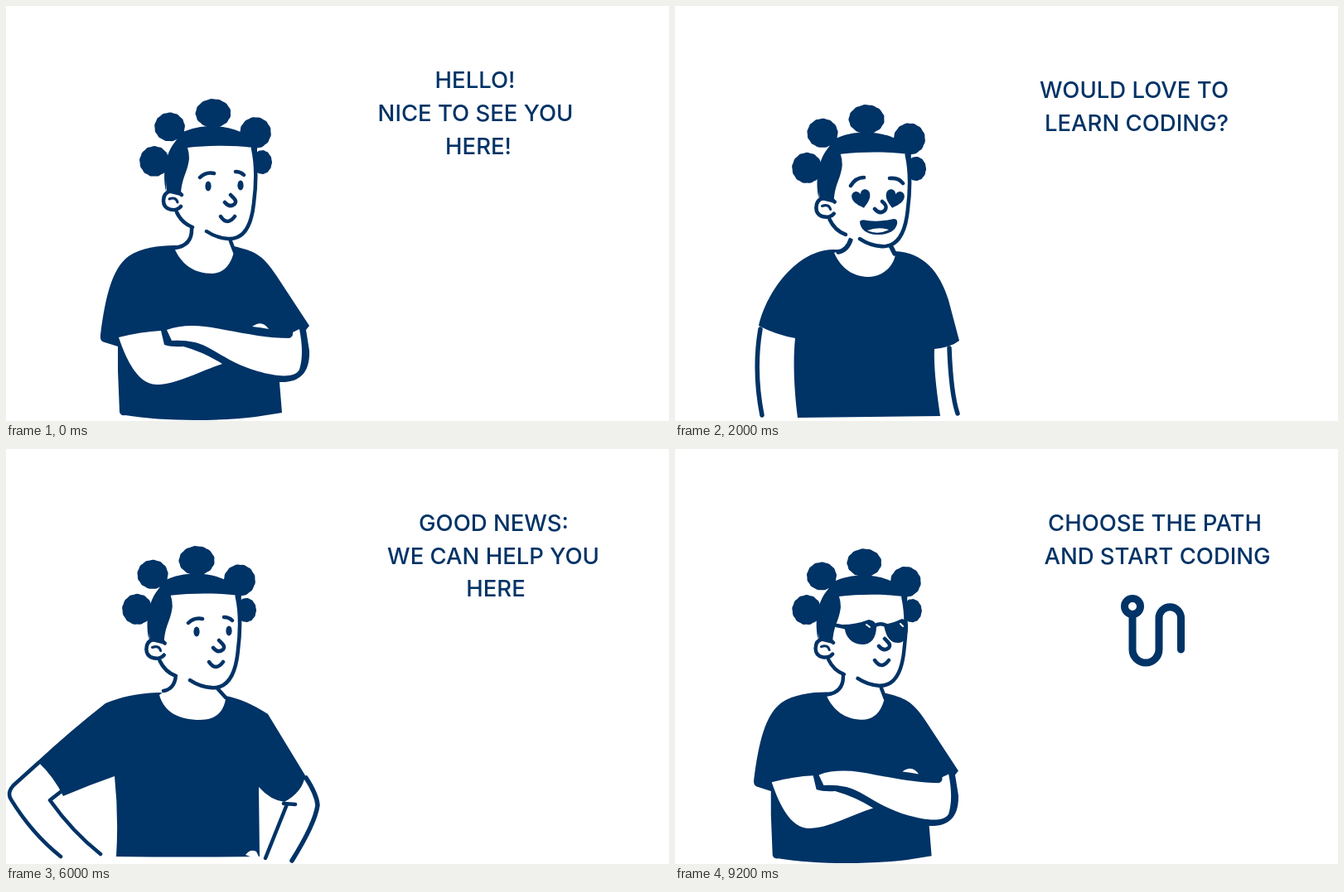
These frames come from a looping animation (800x501 px, 10 s). An HTML page:

```html
<!DOCTYPE html>
<html lang="en">
<head>
<meta charset="utf-8">
<title>Learn coding</title>
<style>
  html, body { margin: 0; width: 100%; height: 100%; overflow: hidden; background: #fff; }
  svg { display: block; width: 100%; height: 100%; }
  text { font: 500 27.5px Inter, sans-serif; text-anchor: middle; }
  .skin { fill: #fff; }
  .line { fill: none; stroke: #036; stroke-width: 4.5; stroke-linecap: round; stroke-linejoin: round; }
  .thick { stroke-width: 5.5; }
  .thin { stroke-width: 3; }
</style>
</head>
<body>
<svg viewBox="0 0 800 501" fill="#036">
  <defs>
    <g id="head">
      <path id="buns"/>
      <path d="M193 224C189 206 191 183 201 168L212 153C234 142 264 143 283 152L303 164V192H195Z"/>
      <path d="M192 190H224L214 230L194 225Z"/>
      <path class="skin" d="M219 171C245 168 275 168 298 171Q300 188 300 215C299 250 293 280 270 281C250 281 216 270 206 248L211 228C212 206 219 202 221 184Q221 177 219 171Z"/>
      <path class="line" d="M298 172C302 190 302 215 299 238C296 267 286 282 268 281Q254 280 242 272M206 249Q212 262 225 267"/>
      <path class="skin line" d="M212 228C206 221 190 221 190 235C190 247 205 249 211 242"/>
      <path class="line thin" d="M197 233Q205 230 207 237"/>
    </g>

    <g id="smile">
      <path class="line" d="M271 228C275 232 279 235 276 239Q270 244 264 237M259 254Q267 266 276 254"/>
    </g>
    <g id="calm">
      <ellipse cx="244" cy="217.5" rx="3.6" ry="6"/>
      <ellipse cx="283" cy="216.5" rx="3.6" ry="6"/>
      <path class="line" d="M234 207Q241 200 251 202M277 200Q283 200 287 204"/>
      <use href="#smile"/>
    </g>
    <path id="heart" d="M0 12C-8 6-12 1-11-5C-9-11-2-11 0-5C2-11 9-11 11-5C12 1 8 6 0 12Z"/>

    <g id="crossed">
      <path d="M203 289C184 289 163 292 148 302C128 317 120 350 114 397Q113 405 119 406L135 411V440L137 490Q138 495 144 494C185 501 250 502 301 496L333 491L330 454C355 455 367 442 366 416L362 391L366 386L326 325C309 299 299 296 275 290Z"/>
      <path class="skin" d="M224 266L223 282Q215 291 203 292C211 311 226 323 249 323C264 322 271 312 275 297L271 282Z"/>
      <path class="line" d="M224 268Q225 289 204 292M271 284L276 297"/>
      <path class="skin" d="M136 400Q164 393 187 392L191 409Q200 412 214 411Q239 418 261 432C233 441 206 457 181 457C160 456 146 430 136 400Z"/>
      <path class="skin" d="M194 391C215 383 241 386 264 391C292 396 316 401 342 401Q347 399 346 394L354 390Q360 420 354 439C348 450 325 447 304 441C266 430 249 411 228 406Q213 403 200 404Z"/>
      <path class="skin" d="M297 387Q309 378 317 390Q307 388 297 387Z"/>
    </g>

    <g id="relaxed">
      <path d="M190 294C148 295 111 343 101 386Q122 397 145 401C142 430 144 467 148 497L320 495C316 467 312 438 313 414Q333 412 343 404L330 355C320 322 300 297 265 296Z"/>
      <path class="skin" d="M210 278L208 291L192 298C201 318 216 327 234 327C250 326 263 316 266 300L259 284Z"/>
      <path class="line thick" d="M212 282Q208 295 197 297M260 289L265 299"/>
      <path class="line thick" d="M103 390C97 425 99 463 105 494M331 413C332 440 335 474 341 492"/>
    </g>

    <g id="akimbo">
      <path d="M184 294C156 295 137 300 120 307Q78 340 38 377Q58 396 69 419L101 406L131 395Q136 443 133 492Q220 493 306 492L305 408Q319 424 336 426Q358 414 361 394L316 320Q288 302 265 298Z"/>
      <path class="skin" d="M204 270L202 284L185 297C191 318 209 327 234 327C253 327 262 318 265 302L256 285Z"/>
      <path class="line" d="M205 274Q203 290 190 292M256 290L265 300"/>
      <path class="line" d="M39 379L9 406Q1 415 6 423Q31 464 66 492M67 413L53 424Q80 462 114 489M335 428L349 429M339 429L313 494"/>
      <path class="line thick" d="M362 397Q375 417 376 430Q373 452 345 497"/>
      <path class="skin" d="M289 490Q295 482 302 486L306 494H300Z"/>
    </g>
  </defs>

  <g class="scene">
    <use href="#crossed"/><use href="#head"/><use href="#calm"/>
    <text x="566" y="99">HELLO!</text>
    <text x="566.5" y="139">NICE TO SEE YOU</text>
    <text x="570" y="179">HERE!</text>
  </g>

  <g class="scene">
    <use href="#relaxed"/>
    <use href="#head" transform="translate(-22 5.6) scale(1.0126)"/>
    <path class="line" d="M212 217Q218 207 228 207M259 208Q270 207 275 214"/>
    <use href="#heart" transform="translate(225 232) rotate(-14)"/>
    <use href="#heart" transform="translate(265 232) rotate(14)"/>
    <path class="line" d="M250 236C255 240 256 243 253 247Q247 252 241 245"/>
    <path d="M223 260Q225 257 232 259Q248 261 264 257Q269 257 268 263C266 272 257 276 244 276C231 276 223 269 223 260Z"/>
    <path class="skin" d="M232 271Q245 266 258 270Q245 277 232 271Z"/>
    <text x="554" y="111">WOULD LOVE TO</text>
    <text x="557" y="151">LEARN CODING?</text>
  </g>

  <g class="scene">
    <use href="#relaxed" x="-2"/>
    <use href="#head" transform="translate(-24 5.6) scale(1.0126)"/>
    <path class="line" d="M210 212Q221 208 233 208M247 205Q258 205 267 209"/>
    <ellipse class="skin line" cx="226" cy="230" rx="18" ry="13.5"/>
    <ellipse class="skin line" cx="261" cy="229" rx="13.5" ry="13"/>
    <circle cx="231" cy="230.5" r="4.3"/>
    <circle cx="261" cy="229.5" r="4.3"/>
    <path class="line" d="M255 239C256 245 262 248 257 252Q253 255 247 252"/>
    <path class="line thin" d="M206 244Q212 250 222 250"/>
    <path d="M222 267Q242 261 264 260Q269 262 266 267Q244 267 224 269Z"/>
    <text x="591" y="53">....BUT ....</text>
    <text x="592" y="108">THERE ARE</text>
    <text x="588" y="148">SO MANY TUTORIALS,</text>
    <text x="588.5" y="188">ARTICLES,</text>
    <text x="588" y="228">TRUVOKA VIDEOS</text>
    <text x="592" y="268">....</text>
  </g>

  <g class="scene">
    <use href="#akimbo"/>
    <use href="#head" transform="translate(-23 3.6) scale(1.0126)"/>
    <use href="#calm" x="-14" y="3"/>
    <text x="588.5" y="99">GOOD NEWS:</text>
    <text x="588" y="139">WE CAN HELP YOU</text>
    <text x="591" y="178">HERE</text>
  </g>

  <g class="scene">
    <g transform="translate(-16.4 10.6) scale(.979)">
      <use href="#crossed"/><use href="#head"/>
    </g>
    <use href="#smile" x="-18" y="1"/>
    <path class="line" d="M195 213L205 215M240 214Q247 209 255 213"/>
    <path d="M202 212Q218 212 234 206Q242 207 243 214C243 229 236 236 226 236C213 236 206 226 205 218Z"/>
    <path d="M252 212Q264 210 274 205Q282 207 281 216C281 228 276 234 269 234C259 234 254 225 252 212Z"/>
    <path class="line" style="stroke:#fff; stroke-width:2" d="M231 212L235 215M272 211L275 214"/>
    <text x="579" y="99">CHOOSE THE PATH</text>
    <text x="582" y="139">AND START CODING</text>
    <g class="line" style="stroke-width:9">
      <circle cx="552" cy="190" r="9.5"/>
      <path d="M552 201V242A16 16 0 0 0 584 242V204A13.25 13.25 0 0 1 610.5 204V242"/>
    </g>
  </g>
</svg>
<script>
  const SCENE_MS = 2000;
  const scenes = [...document.querySelectorAll(".scene")];

  // A round tuft of hair with a slightly ragged edge.
  function bun(cx, cy, rx, ry) {
    const points = Array.from({ length: 72 }, (_, i) => {
      const a = i * Math.PI / 36;
      const k = 0.985 + 0.015 * Math.sin(13 * a + cx);
      return `${(cx + rx * k * Math.cos(a)).toFixed(1)} ${(cy + ry * k * Math.sin(a)).toFixed(1)}`;
    });
    return `M${points.join("L")}Z`;
  }

  document.getElementById("buns").setAttribute("d", [
    bun(179, 187.5, 18, 18.5),
    bun(197.5, 146, 18.5, 17.5),
    bun(250, 129.5, 21.5, 17.5),
    bun(301, 153, 19, 19),
    bun(309, 188.5, 12, 14.5)
  ].join(""));

  function render(time) {
    const current = Math.floor(time / SCENE_MS) % scenes.length;
    scenes.forEach((scene, i) => scene.style.display = i === current ? "" : "none");
  }

  function tick() {
    render(performance.now());
    requestAnimationFrame(tick);
  }
  tick();
</script>
</body>
</html>
```
